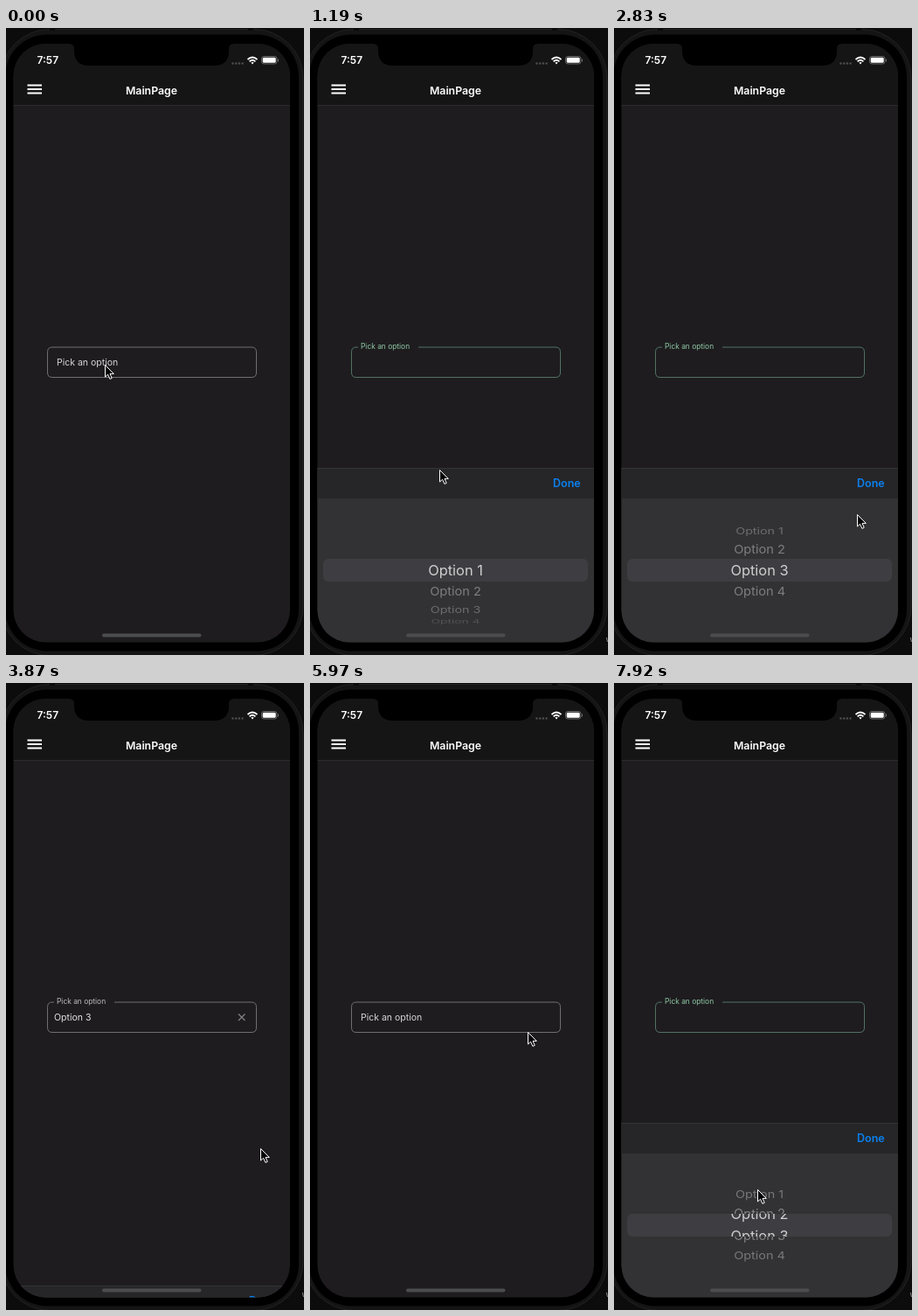
Animation, 341 px wide and 717 px high, one loop 8 s. Source, as an HTML page:

```html
<!DOCTYPE html>
<html lang="en">
<head>
<meta charset="utf-8">
<title>Picker demo</title>
<style>
  html, body { margin: 0; width: 100%; height: 100%; overflow: hidden; background: #0c0c0c; }
  svg { display: block; width: 341px; height: 717px; font-family: Inter, "Open Sans", sans-serif; }
  .bold { font-weight: 600; }
</style>
</head>
<body>
<svg viewBox="0 0 341 717">
  <defs>
    <clipPath id="screen"><rect x="8.5" y="18" width="316.5" height="684.5" rx="37"/></clipPath>
    <clipPath id="inBand"><rect x="15" y="104" width="303" height="26"/></clipPath>
    <clipPath id="offBand"><path d="M0 35H341V104H0ZM0 130H341V200H0Z"/></clipPath>
  </defs>

  <!-- phone body -->
  <rect x="-6" y="1.5" width="346" height="716" rx="56" fill="#141414" stroke="#222"/>
  <path d="M50 1.5H56M277 1.5H283" stroke="#0a0a0a" stroke-width="3"/>
  <rect x="-1" y="7.5" width="336" height="705" rx="48" fill="#000"/>

  <g clip-path="url(#screen)">
    <rect y="18" width="341" height="690" fill="#1e1c1f"/>
    <rect y="18" width="341" height="70" fill="#151515"/>
    <path d="M0 88.5H341" stroke="#2b2b2c"/>
    <path d="M24.5 65.5H41M24.5 70H41M24.5 74.500H41" stroke="#fff" stroke-width="2"/>
    <text class="bold" x="166.5" y="76" font-size="12.3" text-anchor="middle" fill="#fff">MainPage</text>

    <path id="border" fill="none"/>
    <text id="label" font-size="10.5">Pick an option</text>
    <g id="value">
      <text x="55" y="386.3" font-size="10.5" fill="#e4e4e4">Option 3</text>
      <path d="M266 378.5l7.500 7.500m0 -7.500l-7.500 7.500" stroke="#7c7c7e" stroke-width="1.4"/>
    </g>

    <g id="panel">
      <rect width="341" height="215" fill="#323234"/>
      <rect width="341" height="35" fill="#262628"/>
      <path d="M0 .5H341" stroke="#333335"/>
      <text class="bold" x="278" y="22.3" font-size="12.5" fill="#0a80f0">Done</text>
      <rect x="15" y="104" width="303" height="26" rx="6" fill="#3e3e42"/>
      <g id="dim" clip-path="url(#offBand)" font-size="14.7"></g>
      <g id="bright" clip-path="url(#inBand)" font-size="16.4"></g>
    </g>
    <rect x="110" y="692.5" width="113.5" height="4" rx="2" fill="#4c4c4e"/>
  </g>

  <!-- notch and status bar -->
  <path d="M72 17H261V18Q255 18 255 24V26Q255 43 238 43H95Q78 43 78 26V24Q78 18 72 18Z" fill="#000"/>
  <text class="bold" x="35.5" y="41.3" font-size="12" fill="#fff">7:57</text>
  <path d="M259.5 40.5H272" stroke="#4c4c4c" stroke-width="2.6" stroke-linecap="round" stroke-dasharray="0 3.7"/>
  <g fill="none" stroke="#fff" stroke-width="1.8">
    <path d="M276.5 36Q282 31 287.5 36M278.6 38.3Q282 35.2 285.4 38.3"/>
    <path d="M280.3 39.5L282 41.5L283.7 39.5Q282 38.3 280.3 39.5Z" fill="#fff" stroke="none"/>
  </g>
  <rect x="292.5" y="32.5" width="17.5" height="8.5" rx="2.5" fill="none" stroke="#666"/>
  <rect x="293.7" y="33.7" width="15" height="6.1" rx="1.4" fill="#fff"/>
  <path d="M311.5 35.5V38.5" stroke="#666"/>

  <path id="edge" d="M339.3 697l1.2 5" stroke="#8a8a8a" fill="none"/>
  <path id="cursor" d="M.5 .5V14L3.6 11.2L5.9 16.4L8.2 15.4L6 10.4H10.3Z" fill="#000" stroke="#fff"/>
</svg>

<script>
const LOOP = 8000, FIRST = 290, STEP = 149.5, SLACK = 10;
const OPEN = 646, DRAG = 1640, DROP = 2540, PICK = 2900, CLOSE = 3640;
const CLEAR = 5780, REOPEN = 6940, REDRAG = 7770;
const $ = id => document.getElementById(id);

// Pointer strokes: start, end, destination.
const strokes = [
  [200, 440, 127, 393],
  [740, DRAG, 170, 620],
  [DRAG, 1940, 174, 532],
  [2090, DROP, 176, 566],
  [DROP, 2830, 278, 556],
  [2830, 3430, 290, 516],
  [3730, 4470, 295, 669],
  [4470, 5250, 266, 382],
  [5820, 6270, 200, 446],
  [6270, 6720, 119, 389],
  [7020, REDRAG, 163, 620],
  [REDRAG, 7920, 164, 579]
];

const ramp = (t, start, length) => Math.min(1, Math.max(0, (t - start) / length));
const smooth = k => k * k * (3 - 2 * k);

// Critically damped spring from 0 to 1.
function spring(ms) {
  const s = Math.max(0, ms) * 0.01826;
  return 1 - (1 + s) * Math.exp(-s);
}

function pointer(t) {
  let x = 113, y = 385;
  for (const [start, end, toX, toY] of strokes) {
    const k = smooth(ramp(t, start, end - start));
    x += (toX - x) * k;
    y += (toY - y) * k;
  }
  return { x, y };
}

// While dragged the wheel follows the pointer, otherwise it rests on a row.
function wheelPosition(t, pointerY) {
  const dragging = t >= DRAG && t < DROP || t >= REDRAG;
  if (dragging) return (620 - pointerY) / 26.8;
  return t >= DROP && t < CLEAR ? 2 : 0;
}

function makeRows(group, size) {
  return [1, 2, 3, 4].map(n => {
    const row = document.createElementNS("http://www.w3.org/2000/svg", "text");
    row.textContent = "Option " + n;
    row.setAttribute("text-anchor", "middle");
    row.setAttribute("y", size * 0.36);
    row.setAttribute("fill", "#fff");
    group.append(row);
    return row;
  });
}
const dimRows = makeRows($("dim"), 14.7);
const brightRows = makeRows($("bright"), 16.4);

function drawWheel(position) {
  const pitch = 22.2 * Math.PI / 180, radius = 64.3;
  dimRows.forEach((row, i) => {
    const angle = (i - position) * pitch;
    const depth = Math.max(0, Math.cos(angle));
    const y = 117 + radius * Math.sin(angle);
    const place = `translate(166.5 ${y}) scale(${0.9 + 0.1 * depth} ${depth})`;
    row.setAttribute("transform", place);
    row.setAttribute("opacity", 0.4 * depth);
    brightRows[i].setAttribute("transform", place);
    brightRows[i].setAttribute("opacity", 0.75);
  });
}

function drawField(t) {
  const focused = t > OPEN && t < CLOSE || t > REOPEN;
  const back = ramp(t, CLEAR, 170), again = ramp(t, REOPEN, 75);
  const up = ramp(t, OPEN, 90) - back + again;
  const gap = ramp(t, 740, 145) - back + again;
  $("label").setAttribute("transform", `translate(58 ${386.3 - 19.8 * up}) scale(${1 - 0.2 * up})`);
  $("label").setAttribute("fill", focused ? "#8fcaa6" : up > 0.5 ? "#bcbcbe" : "#d6d6d8");
  $("border").setAttribute("stroke", focused ? "#527363" : "#6f6f71");
  $("border").setAttribute("d",
    `M${89 + 35 * gap} 365H281q5.5 0 5.5 5.5V394q0 5.5 -5.5 5.5H53q-5.5 0 -5.5 -5.5V370.5q0 -5.5 5.5 -5.5H${89 - 34 * gap}`);
  $("value").style.display = t > PICK && t < CLEAR ? "" : "none";
}

function draw(t) {
  const { x, y } = pointer(t);
  const open = spring(t - OPEN) - spring(t - CLOSE) + spring(t - REOPEN);
  $("panel").setAttribute("transform", `translate(0 ${Math.round(703 - 200 * open)})`);
  drawWheel(wheelPosition(t, y));
  drawField(t);
  $("cursor").setAttribute("transform", `translate(${Math.round(x)} ${Math.round(y)})`);
  $("edge").style.display = t < FIRST ? "none" : "";
}

// The picture advances in even steps, like a screen recording.
function tick(now) {
  const t = now % LOOP;
  draw(t < FIRST ? 0 : FIRST + Math.floor((t - FIRST + SLACK) / STEP) * STEP);
  requestAnimationFrame(tick);
}
draw(0);
requestAnimationFrame(tick);
</script>
</body>
</html>
```
